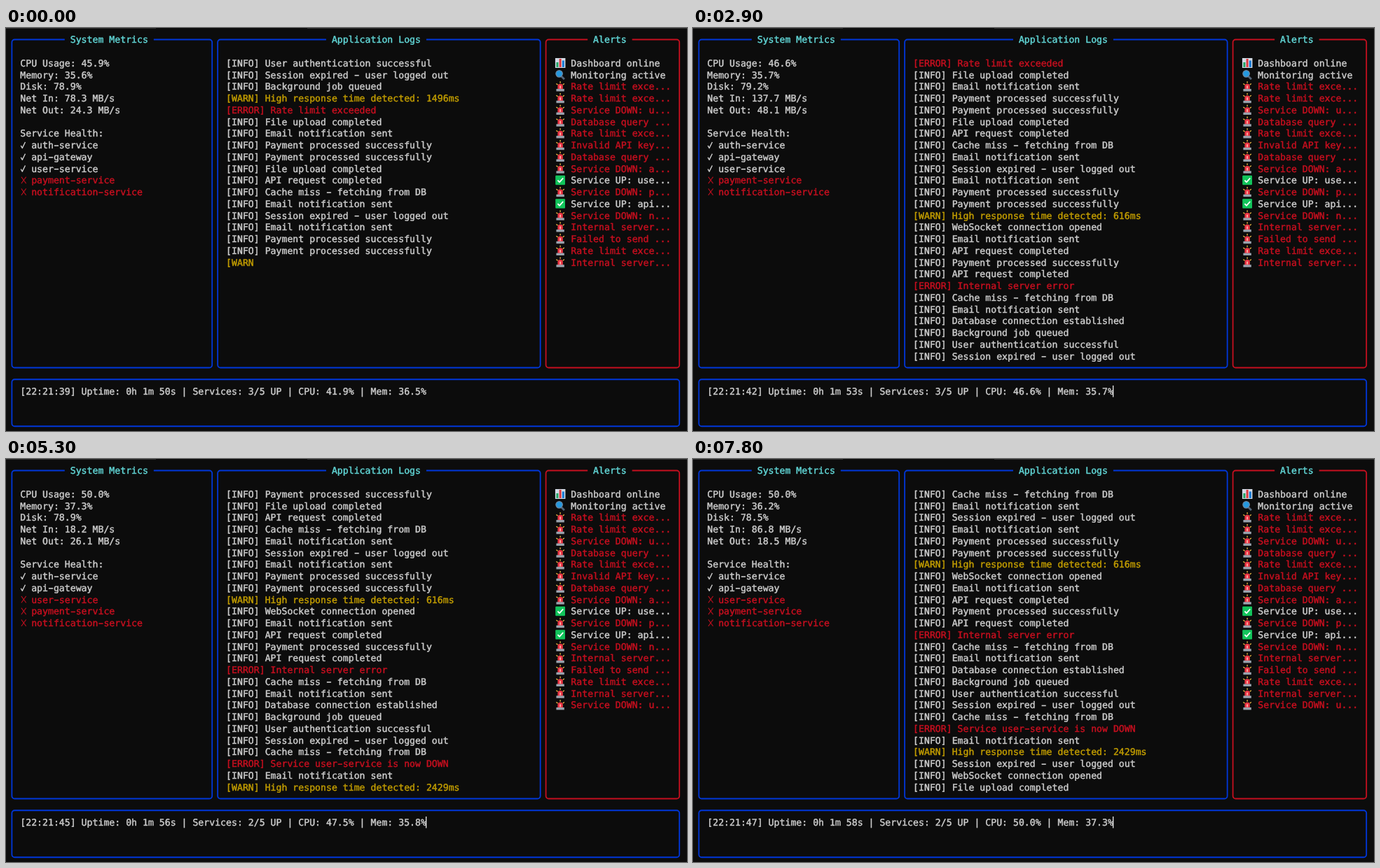
These frames come from a looping animation (972x576 px, 8000 ms). An HTML page with a canvas:

```html
<!DOCTYPE html>
<html lang="en">
<head>
<meta charset="utf-8">
<title>Terminal dashboard</title>
<style>
html, body { margin: 0; width: 100%; height: 100%; overflow: hidden; background: #0c0c0c; }
canvas { display: block; }
</style>
</head>
<body>
<canvas id="screen" width="972" height="576"></canvas>
<script>
const ctx = document.getElementById('screen').getContext('2d');
const LOOP = 8000, CELL = 7.94, LINE = 16.75, LEFT = 4.4, TOP = 16.5, LOG_ROWS = 26;
const COLOR = {
  bg: '#0c0c0c', bar: '#303030', text: '#cccccc', red: '#c50f1f', yellow: '#c19c00',
  blue: '#0037da', cyan: '#61d6d6'
};

const MESSAGES = {
  u: '[INFO] User authentication successful',
  s: '[INFO] Session expired - user logged out',
  b: '[INFO] Background job queued',
  f: '[INFO] File upload completed',
  e: '[INFO] Email notification sent',
  p: '[INFO] Payment processed successfully',
  a: '[INFO] API request completed',
  c: '[INFO] Cache miss - fetching from DB',
  w: '[INFO] WebSocket connection opened',
  d: '[INFO] Database connection established',
  1: '[WARN] High response time detected: 1496ms',
  2: '[WARN] High response time detected: 616ms',
  3: '[WARN] High response time detected: 2429ms',
  R: '[ERROR] Rate limit exceeded',
  I: '[ERROR] Internal server error',
  D: '[ERROR] Service user-service is now DOWN'
};
const LOG = [...'usb1Rfeppfacesepp2weapaIcedbuscDe3swf'].map(k => MESSAGES[k]);

const ALERTS = [
  'Rate limit exce', 'Rate limit exce', 'Service DOWN: u', 'Database query ',
  'Rate limit exce', 'Invalid API key', 'Database query ', 'Service DOWN: a',
  'Service UP: use', 'Service DOWN: p', 'Service UP: api', 'Service DOWN: n',
  'Internal server', 'Failed to send ', 'Rate limit exce', 'Internal server',
  'Service DOWN: u'
];
const SERVICES = ['auth', 'api', 'user', 'payment', 'notification'];

// Moments at which each part of the screen is refreshed
const FILL = 100, ALERT_AT = 4100, USER_DOWN = 5300;
const SCROLLS = [500, 1300, 2100, 2900, 3700, 4100, 4500, 5300, 6100, 7000, 7800];
const SECONDS = [100, 1100, 2100, 3100, 4100, 5100, 6200, 7100];
const METRICS = [
  [0, '45.9', '35.6', '78.9', '78.3', '24.3'],
  [1300, '46.6', '35.7', '79.2', '137.7', '48.1'],
  [3300, '47.5', '35.8', '79.0', '2.7', '62.8'],
  [5300, '50.0', '37.3', '78.9', '18.2', '26.1'],
  [7300, '50.0', '36.2', '78.5', '86.8', '18.5']
];
const USAGE = [
  [0, '41.9', '36.5'], [100, '45.9', '35.6'], [2100, '46.6', '35.7'],
  [4100, '47.5', '35.8'], [6200, '50.0', '37.3']
];

const passed = (times, t) => times.filter(at => at <= t).length;
const latest = (rows, t) => rows[passed(rows.map(r => r[0]), t) - 1];
const colX = col => LEFT + col * CELL;
const rowY = row => TOP + row * LINE;

function box(x, y, w, h, color) {
  ctx.fillStyle = color;
  ctx.fillRect(x, y, w, h);
}

function poly(points, color, width) {
  ctx.beginPath();
  points.forEach(([x, y]) => ctx.lineTo(x, y));
  if (width) {
    ctx.strokeStyle = color;
    ctx.lineWidth = width;
    ctx.stroke();
  } else {
    ctx.fillStyle = color;
    ctx.fill();
  }
}

function print(col, row, text, color = COLOR.text) {
  const y = rowY(row);
  ctx.fillStyle = ctx.strokeStyle = color;
  ctx.lineWidth = 0.45;
  [...text].forEach((ch, i) => {
    const x = colX(col + i);
    if (ch === '-') {
      ctx.fillRect(x + 0.9, y + 0.2, 6.2, 1.6);
    } else if (ch !== ' ') {
      ctx.fillText(ch, x, y + 4.9);
      ctx.strokeText(ch, x, y + 4.9);
    }
  });
}

function panel(c0, c1, r0, r1, color, title) {
  const x = colX(c0 + 0.5), y = rowY(r0);
  ctx.strokeStyle = color;
  ctx.lineWidth = 1.8;
  ctx.beginPath();
  ctx.roundRect(x, y, colX(c1 + 0.5) - x, rowY(r1) - y, 4);
  ctx.stroke();
  if (!title) return;
  const start = c0 + 1 + Math.floor((c1 - c0 - 3 - title.length) / 2);
  box(colX(start), y - 3, (title.length + 2) * CELL, 6, COLOR.bg);
  print(start + 1, r0, title, COLOR.cyan);
}

function icon(row, draw) {
  ctx.save();
  ctx.translate(colX(98) + 0.9, rowY(row));
  draw();
  ctx.restore();
}

function chart() {
  box(0.5, -7, 14.5, 14, '#d3dbe6');
  box(2, -1, 3, 7, '#1fa463');
  box(6.2, -6, 3, 12, '#e0393f');
  box(10.4, -3.5, 3, 9.5, '#1479d4');
}

function lens() {
  poly([[9.5, 2.5], [13.5, 6.5]], '#53657a', 2.8);
  ctx.beginPath();
  ctx.arc(6.2, -1.4, 4.7, 0, 7);
  ctx.fillStyle = '#2499e0';
  ctx.fill();
  ctx.strokeStyle = '#6f8ba5';
  ctx.lineWidth = 1.3;
  ctx.stroke();
}

function siren() {
  poly([[2, -4], [4.2, -2.3]], '#f3bd45', 1.3);
  poly([[7.7, -7.3], [7.7, -4.8]], '#f3bd45', 1.3);
  poly([[13.4, -4], [11.2, -2.3]], '#f3bd45', 1.3);
  ctx.fillStyle = '#ec3444';
  ctx.beginPath();
  ctx.roundRect(4, -3.8, 7.4, 8, [3.5, 3.5, 0, 0]);
  ctx.fill();
  box(6.8, -1, 1.8, 4, '#ffb3a5');
  box(2, 3.6, 11.4, 3.4, '#9aa3ae');
}

function checkBox() {
  ctx.fillStyle = '#12c45b';
  ctx.beginPath();
  ctx.roundRect(0.8, -6.8, 13.8, 13.6, 1);
  ctx.fill();
  poly([[4, 0.2], [6.6, 2.9], [11.8, -3]], '#ffffff', 1.8);
}

function mark(row, up, color) {
  ctx.save();
  ctx.translate(colX(2), rowY(row));
  if (up) {
    poly([[1, 0.8], [3, 4.4], [7.2, -4.2]], color, 1.4);
  } else {
    poly([[1.6, -4.8], [8.4, 4.8]], color, 1.1);
    poly([[8.4, -4.8], [1.6, 4.8]], color, 1.1);
  }
  ctx.restore();
}

function drawMetrics(t) {
  const [, cpu, mem, disk, netIn, netOut] = latest(METRICS, t);
  [`CPU Usage: ${cpu}%`, `Memory: ${mem}%`, `Disk: ${disk}%`, `Net In: ${netIn} MB/s`,
    `Net Out: ${netOut} MB/s`, '', 'Service Health:'].forEach((s, i) => print(2, i + 2, s));
  SERVICES.forEach((name, i) => {
    const up = i < 2 || (i === 2 && t < USER_DOWN);
    const color = up ? COLOR.text : COLOR.red;
    mark(i + 9, up, color);
    print(4, i + 9, name + (name === 'api' ? '-gateway' : '-service'), color);
  });
}

function drawLog(t) {
  const first = passed(SCROLLS, t);
  let lines = LOG.slice(first, first + LOG_ROWS);
  if (t < FILL) lines = [...lines.slice(0, 17), '[WARN'];
  lines.forEach((s, i) => {
    const color = s[1] === 'W' ? COLOR.yellow : s[1] === 'E' ? COLOR.red : COLOR.text;
    print(39, i + 2, s, color);
  });
}

function drawAlerts(t) {
  icon(2, chart);
  icon(3, lens);
  print(101, 2, 'Dashboard online');
  print(101, 3, 'Monitoring active');
  ALERTS.slice(0, t < ALERT_AT ? -1 : undefined).forEach((s, i) => {
    const up = s.includes('UP');
    icon(i + 4, up ? checkBox : siren);
    print(101, i + 4, s + '...', up ? COLOR.text : COLOR.red);
  });
}

function drawStatus(t) {
  const n = passed(SECONDS, t), [, cpu, mem] = latest(USAGE, t);
  const up = t < ALERT_AT ? 3 : 2;
  print(2, 30, `[22:21:${39 + n}] Uptime: 0h 1m ${50 + n}s | Services: ${up}/5 UP | CPU: ${cpu}% | Mem: ${mem}%`);
  if (t >= FILL) box(colX(75) - 0.8, rowY(30) - 8, 1.2, 16.5, '#ffffff');
}

function draw(t) {
  box(0, 0, 972, 576, COLOR.bg);
  // Lower edge of the tab bar, open below the active tab
  box(0, 0, 214, 1, COLOR.bar);
  box(430, 0, 542, 1, COLOR.bar);
  ctx.font = `${CELL / 0.602}px "DejaVu Sans Mono", "Noto Sans Mono", monospace`;
  ctx.textRendering = 'geometricPrecision';
  ctx.lineJoin = 'round';
  panel(0, 36, 0, 28, COLOR.blue, 'System Metrics');
  panel(37, 95, 0, 28, COLOR.blue, 'Application Logs');
  panel(96, 120, 0, 28, COLOR.red, 'Alerts');
  panel(0, 120, 29, 33, COLOR.blue);
  drawMetrics(t);
  drawLog(t);
  drawAlerts(t);
  drawStatus(t);
}

const start = performance.now();
function tick(now) {
  draw(Math.max(0, now - start) % LOOP);
  requestAnimationFrame(tick);
}
draw(0);
requestAnimationFrame(tick);
</script>
</body>
</html>
```
